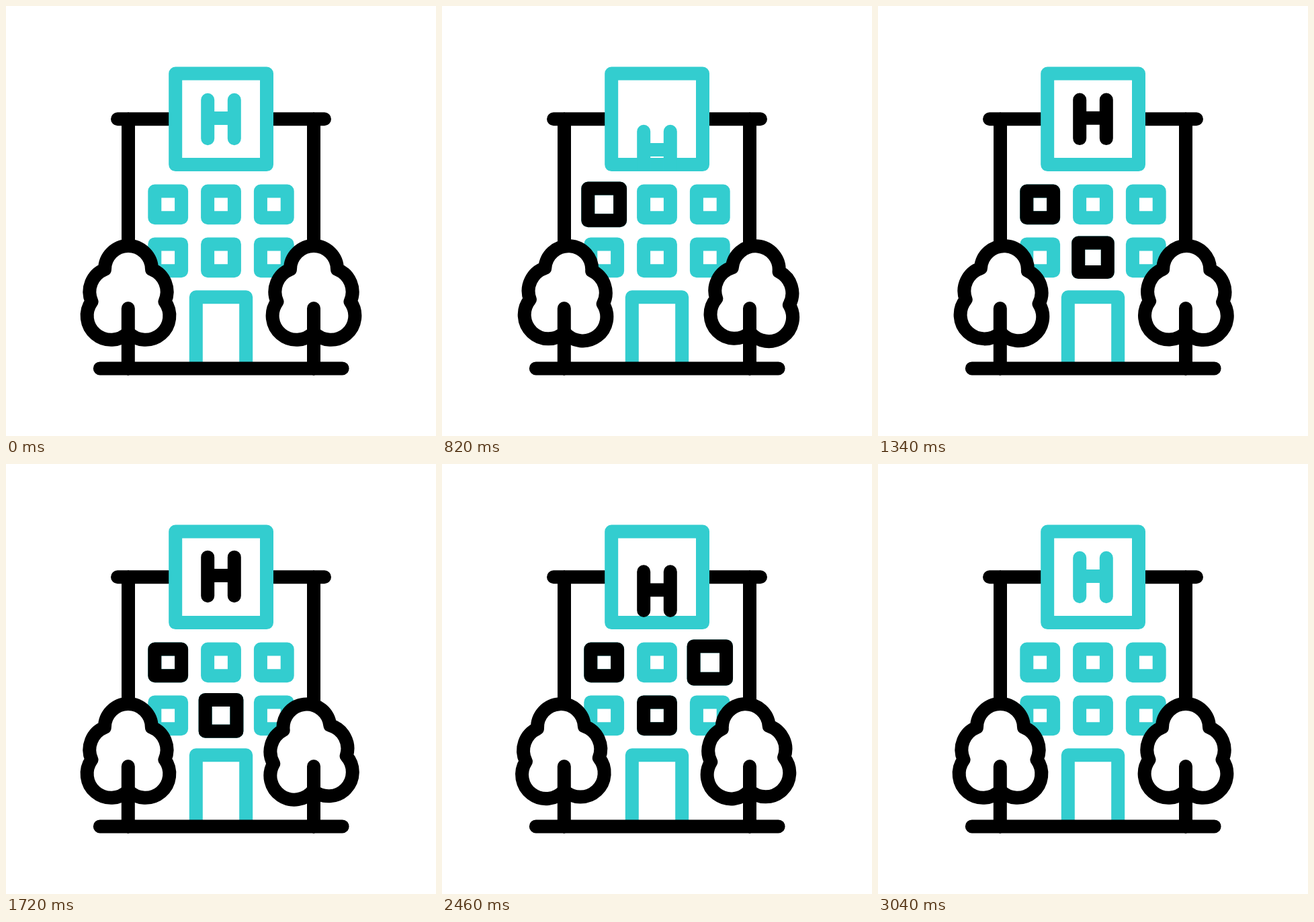
An HTML page for the animation above (3140 ms loop, 640 px wide and 640 px high).

```html
<!DOCTYPE html>
<html lang="en">
<head>
<meta charset="utf-8">
<title>Hospital</title>
<style>
  html, body { margin: 0; width: 100%; height: 100%; overflow: hidden; background: #fff; }
  svg { display: block; width: 100vw; height: 100vh; }
  .line { fill: none; stroke: #000; stroke-width: 20; stroke-linecap: round; stroke-linejoin: round; }
  .teal { stroke: #33cdcf; }
  .flat { stroke-linecap: butt; }
  .solid { fill: #fff; }
</style>
</head>
<body>
<svg viewBox="0 0 640 640">
  <defs>
    <clipPath id="signArea"><rect x="242" y="90" width="156" height="156" rx="10"/></clipPath>
    <path id="crown" d="M182 486 A35.75 35.75 0 0 1 127.5 440 A36 36 0 0 1 147 392
      A35 35 0 0 1 217 392 A36 36 0 0 1 236.5 440 A35.75 35.75 0 0 1 182 486 Z"/>
  </defs>
  <path class="line" d="M166 168.3H474M182 168V360M458 168V360"/>
  <g id="rays"></g>
  <rect class="line teal solid" x="252.2" y="100.5" width="135.8" height="135.6"/>
  <g clip-path="url(#signArea)">
    <path id="letter" class="line" d="M300.2 139.7V197.3M339.8 139.7V197.3M300.2 167H339.8"/>
  </g>
  <g id="windows"></g>
  <path class="line teal flat" d="M282.8 540V433.3H357.2V540"/>
  <use id="treeL" href="#crown" class="line solid"/>
  <use id="treeR" href="#crown" class="line solid"/>
  <path class="line" d="M181.8 450V540M458 450V540M139.8 539.4H500.6"/>
</svg>
<script>
const LOOP = 3140, STEP = 20, LAST = 3040;
const TEAL = '#33cdcf';
const $ = id => document.getElementById(id);

const ease = {
  lin: t => t,
  in: t => t * t,
  out: t => 1 - (1 - t) * (1 - t),
  both: t => t < .5 ? 2 * t * t : 1 - 2 * (1 - t) * (1 - t),
  sine: t => (1 - Math.cos(Math.PI * t)) / 2
};

// keys: [time, value, easing used to arrive there]
function track(keys, t) {
  if (t <= keys[0][0]) return keys[0][1];
  for (let i = 1; i < keys.length; i++) {
    const [t0, v0] = keys[i - 1], [t1, v1, e = 'sine'] = keys[i];
    if (t < t1) return v0 + (v1 - v0) * ease[e]((t - t0) / (t1 - t0));
  }
  return keys[keys.length - 1][1];
}

function add(parent, tag, cls) {
  const el = document.createElementNS('http://www.w3.org/2000/svg', tag);
  el.setAttribute('class', cls);
  return parent.appendChild(el);
}

function set(el, attrs) {
  for (const k in attrs) el.setAttribute(k, attrs[k]);
}

// Letter: small lift, drop out below, re-enter from above
const drop = (s, from) => [
  [s, from], [s + 160, -20, 'both'], [s + 420, 120, 'in'],
  [s + 420, -120], [s + 580, 8, 'out'], [s + 740, 0, 'both']
];
const letterY = [...drop(480, 0), [1240, 0], [2160, -2, 'lin'], ...drop(2160, -2).slice(1)];

// Windows: three of them pop in turn and become black
const popAt = { 0: 400, 4: 1240, 2: 2080 };
const pop = [[0, 0], [240, 11, 'both'], [900, 0, 'lin']];
const fade = [[2780, 1], [3020, 0]];
const panes = [];
for (let i = 0; i < 6; i++) {
  const pane = { x: 241.2 + 78.8 * (i % 3), y: 295.4 + 78.9 * (i > 2), start: popAt[i], rects: [] };
  pane.rects.push(add($('windows'), 'rect', 'line teal'));
  if (i in popAt) pane.rects.push(add($('windows'), 'rect', 'line'));
  panes.push(pane);
}

function drawPane(p, t) {
  const size = 39.8 + (p.start ? track(pop, t - p.start) : 0);
  for (const r of p.rects) {
    set(r, { x: p.x - size / 2, y: p.y - size / 2, width: size, height: size });
  }
  if (p.start) p.rects[1].style.opacity = t < p.start + 90 ? 0 : track(fade, t);
}

// Rays: a short dash runs outward along each line
const rays = [
  [289.5, 91.8, 263, 58.5],
  [323.4, 100, 320, 35],
  [360, 86.5, 378.2, 59]
].map(p => ({ p, el: add($('rays'), 'line', 'line teal') }));
const head = [[2480, 0], [2840, 1, 'both']];
const tail = [[2560, 0], [2960, 1, 'both']];

function drawRay({ p: [x0, y0, x1, y1], el }, t) {
  const h = track(head, t), e = track(tail, t);
  const x = k => x0 + (x1 - x0) * k, y = k => y0 + (y1 - y0) * k;
  set(el, { x1: x(e), y1: y(e), x2: x(h), y2: y(h) });
  el.style.display = h > 0 && e < 1 ? '' : 'none';
}

// Trees: sideways shift of the top, turned into a rotation about the trunk
const swayL = [[100, 0], [1080, 10], [2260, -8], [3040, 0]];
const swayR = [[100, 0], [900, 12], [2040, -20], [2800, 0]];

function drawTree(el, dx, sway, t) {
  el.setAttribute('transform', `translate(${dx} 0) rotate(${track(sway, t) * .418} 182 494)`);
}

function draw(t) {
  const letter = $('letter');
  letter.setAttribute('transform', `translate(0 ${track(letterY, t)})`);
  letter.style.stroke = t >= 900 && t < 2580 ? '#000' : TEAL;
  panes.forEach(p => drawPane(p, t));
  rays.forEach(r => drawRay(r, t));
  drawTree($('treeL'), 0, swayL, t);
  drawTree($('treeR'), 276, swayR, t);
}

const begin = performance.now();
function tick() {
  const t = (performance.now() - begin) % LOOP;
  draw(Math.min(LAST, Math.floor(t / STEP) * STEP));
  requestAnimationFrame(tick);
}
tick();
</script>
</body>
</html>
```
